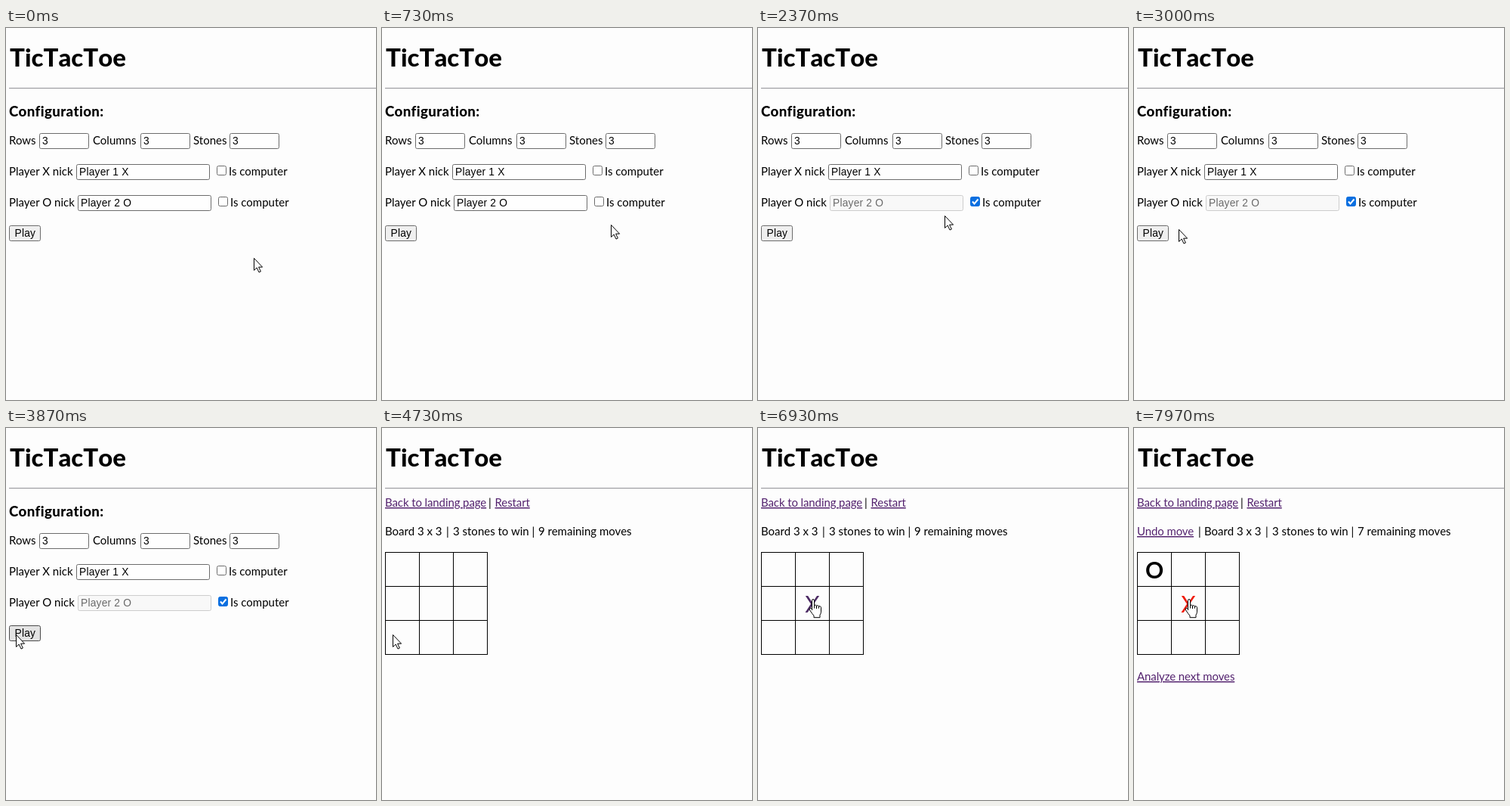
An HTML page for the animation above (8000 ms loop, 490 by 492 pixels).

```html
<!DOCTYPE html>
<html lang="en">
<head>
<meta charset="utf-8">
<title>TicTacToe</title>
<style>
  html, body { margin: 0; width: 100%; height: 100%; overflow: hidden; background: #fdfdfd; }
  svg { display: block; width: 490px; height: 492px; font: 15px Lato, sans-serif; }
  .title { font-size: 33px; font-weight: 800; font-kerning: none; }
  .heading { font-size: 18.7px; font-weight: 800; letter-spacing: .4px; }
  .link { fill: #54236f; text-decoration: underline; letter-spacing: -.1px; }
  .control { font: 13.8px "Liberation Sans", Arial, sans-serif; letter-spacing: .2px; }
  .box { fill: #fefefe; stroke: #6c6c6c; }
  .disabled .box { fill: #f8f8f8; stroke: #cdcdcd; }
  .disabled text { fill: #6a6a6a; }
  .button .box { fill: #efefef; }
  .button.hover .box { fill: #e3e3e3; stroke: #4a4a4a; }
  .check.hover .box { stroke: #333; }
  .tick { visibility: hidden; }
  .checked .box { fill: #0b6fe0; stroke: #0b6fe0; }
  .checked .tick { visibility: visible; }
  .mark { font-size: 30px; text-anchor: middle; }
  .grid { fill: none; stroke: #000; }
  .cursor { fill: #fff; stroke: #000; stroke-linejoin: round; }
</style>
</head>
<body>
<svg id="stage" viewBox="0 0 490 492"></svg>
<script>
const LOOP = 8000;
const CHECK_AT = 1690, PLAY_AT = 4120, HAND_AT = 5180, MOVE_AT = 7330;

// Pointer tip: time, x, y
const path = [
  [0, 328, 304], [30, 328, 304], [170, 324, 297], [330, 324, 297],
  [700, 305, 262], [1130, 284, 228], [1970, 284, 228], [2370, 247, 248],
  [2700, 150, 263], [3050, 44, 267], [3500, 20, 268], [3720, 13, 273],
  [4250, 14, 273], [5150, 14, 273], [5250, 20, 271], [5420, 44, 258],
  [5640, 73, 226], [LOOP, 73, 226]
];

const text = (x, y, content, cls = '') => `<text x="${x}" y="${y}" class="${cls}">${content}</text>`;
const rect = (x, y, w, h) => `<rect class="box" x="${x + .5}" y="${y + .5}" width="${w - 1}" height="${h - 1}" rx="2"/>`;
const field = (x, y, w, value, id = '') =>
  `<g id="${id}" class="control">${rect(x, y, w, 21)}${text(x + 4, y + 15, value)}</g>`;
const checkbox = (x, y, id) =>
  `<g id="${id}" class="check">${rect(x, y, 13, 13)}
   <path class="tick" d="M${x + 3} ${y + 6.5}l2.5 3 5-6" fill="none" stroke="#fff" stroke-width="2"/></g>`;
const player = (name, x, y, value, id) =>
  text(4, y + 15, `Player ${name} nick`) + field(x, y, 177, value, id + 'Field') +
  checkbox(x + 186, y + 2, id + 'Check') + text(x + 202, y + 15, 'Is computer');
const status = (x, remaining) =>
  text(x, 142, 'Board 3 x 3') + text(x + 81, 142, '|') + text(x + 90, 142, '3 stones to win') +
  text(x + 194.5, 142, '|') + text(x + 203, 142, `${remaining} remaining moves`);
const lines = [0, 1, 2, 3].map(i => `M4 ${164.5 + 45 * i}h136M${4.5 + 45 * i} 164v136`).join('');

stage.innerHTML = `
  ${text(5, 51, 'TicTacToe', 'title')}
  <path d="M4 79.5h486" stroke="#9c9ca2"/><path d="M4 80.5h486" stroke="#ececec"/>
  <g id="config">
    ${text(4, 117, 'Configuration:', 'heading')}
    ${text(4, 154, 'Rows')}${field(44, 139, 66, 3)}
    ${text(115, 154, 'Columns')}${field(178, 139, 66, 3)}
    ${text(248, 154, 'Stones')}${field(296, 139, 66, 3)}
    ${player('X', 93, 180, 'Player 1 X', 'x')}
    ${player('O', 95, 221, 'Player 2 O', 'o')}
    <g id="play" class="control button">${rect(4, 261, 42, 21)}${text(11.5, 276, 'Play')}</g>
  </g>
  <g id="game">
    ${text(4, 104, 'Back to landing page', 'link')}${text(141, 104, '|')}${text(149.5, 104, 'Restart', 'link')}
    <g id="before">${status(4, 9)}</g>
    <g id="after">
      ${text(4, 142, 'Undo move', 'link')}${text(85, 142, '|')}${status(93, 7)}
      <text class="mark" x="27" y="199" font-weight="700">O</text>
      ${text(4, 334, 'Analyze next moves', 'link')}
    </g>
    <path class="grid" d="${lines}"/>
    <text id="stone" class="mark">X</text>
  </g>
  <path id="arrow" class="cursor" d="M.5 .5v16l3.7-3.4 2.8 6 2.4-1.1-2.8-5.8h5z"/>
  <path id="hand" class="cursor" d="M-1.5 15V2.5q0-2 1.5-2t1.5 2v6q2.5-1 3 .5 2.5-.8 3 .7 2.5-.5 3 1.5v6q0 2-1.5 4v3.5h-8v-2.5q-2-2-5.5-7.5-1-2 .5-2.5 1.2-.2 2.5 1zM1.5 8.5v4M4.5 9v4M7.5 9.7v3"/>`;

const $ = id => document.getElementById(id);
const show = (id, on) => $(id).setAttribute('visibility', on ? 'inherit' : 'hidden');
const inside = ([x, y], left, top, w, h) => x >= left && x < left + w && y >= top && y < top + h;

function pointerAt(t) {
  const i = path.findIndex(p => p[0] > t);
  const [a, b] = [path[i - 1], path[i]];
  const k = (t - a[0]) / (b[0] - a[0]);
  return [1, 2].map(n => Math.round(a[n] + (b[n] - a[n]) * k));
}

function draw(t) {
  const tip = pointerAt(t);
  const playing = t >= PLAY_AT, moved = t >= MOVE_AT, hand = t >= HAND_AT;
  const checked = t >= CHECK_AT;

  // Hidden ticks must follow their page, so the pages switch by display.
  $('config').style.display = playing ? 'none' : '';
  $('game').style.display = playing ? '' : 'none';
  show('before', !moved);
  show('after', moved);
  $('oField').classList.toggle('disabled', checked);
  $('oCheck').classList.toggle('checked', checked);
  $('oCheck').classList.toggle('hover', inside(tip, 281, 223, 13, 13));
  $('play').classList.toggle('hover', inside(tip, 4, 261, 42, 21));

  const [col, row] = [Math.floor((tip[0] - 4) / 45), Math.floor((tip[1] - 164) / 45)];
  show('stone', hand);
  $('stone').setAttribute('x', 27 + 45 * col);
  $('stone').setAttribute('y', 199 + 45 * row);
  $('stone').setAttribute('fill', moved ? '#f01c0c' : '#4c2a64');

  show('arrow', !hand);
  show('hand', hand);
  for (const id of ['arrow', 'hand']) $(id).setAttribute('transform', `translate(${tip})`);
}

function frame() {
  draw(performance.now() % LOOP);
  requestAnimationFrame(frame);
}
frame();
</script>
</body>
</html>
```
